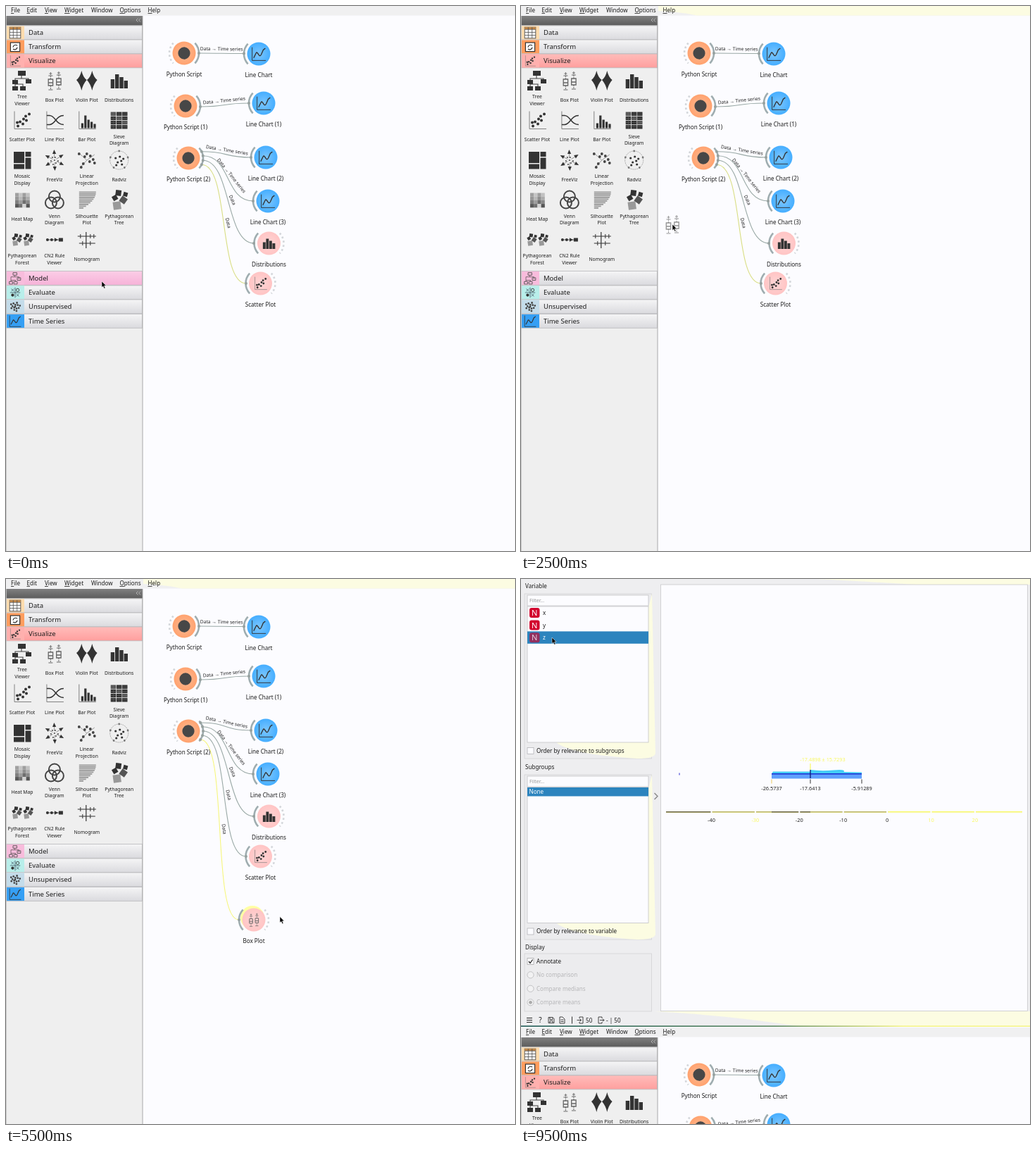
An HTML page that plays this animation: 723 px wide and 774 px high, repeating every 10000 ms.

```html
<!DOCTYPE html>
<html lang="en">
<head>
<meta charset="utf-8">
<title>Workflow editor</title>
<style>
html, body { margin: 0; width: 100%; height: 100%; overflow: hidden; background: #fcfcff; }
svg { display: block; width: 723px; height: 774px; font-family: "Noto Sans", "Open Sans", sans-serif; }
</style>
</head>
<body>
<svg id="stage" viewBox="0 0 723 774"></svg>
<script>
const INK = '#333', YELLOW = '#f8f860', WASH = '#fcfce2', BLUE = '#2c84be';
const PINK = '#ffc4c4', SKY = '#45aeff', ORANGE = '#ffa26e';

const rect = (x, y, w, h, fill, more = '') =>
  `<rect x="${x}" y="${y}" width="${w}" height="${h}" fill="${fill}" ${more}/>`;
const circle = (x, y, r, fill, more = '') =>
  `<circle cx="${x}" cy="${y}" r="${r}" fill="${fill}" ${more}/>`;
const fillPath = (d, fill = INK) => `<path d="${d}" fill="${fill}"/>`;
const line = (d, color = INK, width = 1, more = '') =>
  `<path d="${d}" fill="none" stroke="${color}" stroke-width="${width}" ${more}/>`;
const text = (x, y, s, size = 8.1, anchor = 'start', fill = '#1c1c1c') =>
  `<text x="${x}" y="${y + size * 0.36}" font-size="${size}" text-anchor="${anchor}" fill="${fill}">${s}</text>`;
const at = (x, y, body, scale = 1) => `<g transform="translate(${x} ${y}) scale(${scale})">${body}</g>`;
const range = n => [...Array(n).keys()];
const box = (x, y, w, h) => `M${x},${y}h${w}v${h}h${-w}z`;
const dot = (x, y, r = 1.7) => `M${x - r},${y}a${r},${r} 0 1 0 ${2 * r},0a${r},${r} 0 1 0 ${-2 * r},0z`;
const dots = (pts, r) => pts.map(p => dot(p[0], p[1], r)).join('');

const AXES = line('M-11,-13V12H13', '#777', 0.9);
const CLOUD = [[-6, 8], [-3, 2], [1, 5], [2, -2], [6, 0], [10, -9], [5, -6], [-7, 3]];
const square = (x, y, s, turn, fill = INK) =>
  `<rect x="${-s / 2}" y="${-s / 2}" width="${s}" height="${s}" fill="${fill}" transform="translate(${x} ${y}) rotate(${turn})"/>`;
const sapling = square(-3, 8, 11, -8, '#999') + square(-6, -3, 7, -30) + square(6, 0, 9, 35, '#555') +
  square(-1, -10, 8, 8) + square(9, -8, 6, 15);
const boxGlyph = (x, y) => at(x, y, line('M-3,-9h6M-3,11h6', '#666') +
  line('M0,-9V-4M0,5V11', '#666', 1, 'stroke-dasharray="2 1"') +
  line(box(-3.2, -4, 6.4, 9) + 'M-3.2,1h6.4', '#666', 1.3) + line('M-2,-12h4M0,-14v4', '#666', 0.9));
const crown = line('M-1,-7V-3M-10,3V-3H9V2M-10,3V8M-10,5H1V9', '#444', 1.1);

const icons = {
  tree: crown + fillPath(box(-6, -14, 11, 7) + box(5, -2, 8, 6) + box(-14, -1, 8, 6) + box(-14, 8, 8, 6) + box(-3, 8, 8, 6)),
  branches: crown + line(box(-5, -13, 9, 6) + box(5, -1, 8, 6) + box(-14, 8, 8, 6) + box(-3, 8, 8, 6), '#555', 1.5),
  box: boxGlyph(-5.5, 2) + boxGlyph(6, 1),
  violin: fillPath([-7.5, 7.5].map(x =>
    `M${x},-14Q${x + 2},-5 ${x + 7.3},-1Q${x + 2},5 ${x},14Q${x - 2},5 ${x - 7.3},-1Q${x - 2},-5 ${x},-14z`).join('')),
  dist: fillPath([13, 20, 16, 11].map((h, i) => box(-12 + i * 6.3, 11 - h, 5.4, h)).join('')),
  scatter: AXES + fillPath(dots(CLOUD, 2)),
  line: AXES + line('M-11,-7H-7C1,-7 2,6 13,6M-11,6H-7C1,6 2,-7 13,-7', INK, 1.5),
  bar: AXES + fillPath([7, 18, 12, 9, 6].map((h, i) => box(-8 + i * 4.4, 11 - h, 3.2, h)).join('')),
  sieve: range(12).map(i => rect(-12 + i % 3 * 8.2, -12 + (i / 3 | 0) * 6.2, 7.4, 5.4, i % 4 ? '#333' : '#555')).join('') +
    line('M-12,-9H12M-12,-3H12M-12,3H12M-12,9H12M-8,-12V12M4,-12V12', '#777', 0.4),
  mosaic: fillPath(box(-12, -12, 15, 16) + box(4.5, -12, 8, 7) + box(4.5, -3.5, 8, 16) + box(-12, 5.5, 15, 7)),
  freeviz: range(6).map(i => `<g transform="rotate(${i * 60 + 28})">${line('M3,0H11', '#888', 0.8)}${fillPath('M15,0L9,-2.6V2.6z')}</g>`).join('') +
    fillPath(dots([[-5, 1], [-2, 6], [1, -4], [5, 1], [2, 4], [-3, -4], [0, 0]], 1.1), '#555'),
  linear: line('M0,0L-11,-10M0,0L11,-8M0,0L-10,11', '#999', 1) +
    fillPath(dots([[-11, -9], [-3, -5], [0, -9], [5, -6], [9, -1], [11, 4], [4, 2], [-5, 5], [-8, 10]], 1.9), '#444'),
  radviz: line(dot(0, 0, 13), '#999', 0.8, 'stroke-dasharray="2 1"') +
    fillPath(dots(range(5).map(i => [13 * Math.sin(i * 1.257), -13 * Math.cos(i * 1.257)]), 1.4), '#777') +
    fillPath(dots([[-5, -3], [-2, 3], [1, -5], [3, 1], [6, -2], [4, 6], [-4, 7]], 1.6)),
  heat: range(16).map(i => {
    const v = 70 + (i * i * 37 + 90) % 150;
    return rect(-10 + i % 4 * 5.2, -10 + (i >> 2) * 5.2, 5.2, 5.2, `rgb(${v},${v},${v})`);
  }).join(''),
  venn: [[0, -5], [-5, 4], [5, 4]].map(p => circle(p[0], p[1], 8, 'none', 'stroke="#444" stroke-width="2"')).join(''),
  silhouette: range(10).map(i => rect(-11, -12 + i * 2.5, 24 - i * i * 0.22, 1.8, '#999')).join(''),
  pytree: sapling,
  forest: at(-8, 0, sapling, 0.62) + at(8, 0, sapling, 0.62),
  rules: line('M-11,0H8', INK, 0.8) + fillPath(dots([[-10, 0], [-4, 0]], 2) + 'M5,0L0,-2.7V2.7z' + box(6, -2.5, 6, 5)),
  nomogram: line('M-13,-5H13M-11,5H12M-1,-11V12', INK, 1.2) +
    line('M-9,-8v6M5,-8v6M10,-8v6M-6,2v6M5,2v6', INK, 1),
  chart: line('M-13,-13V13H14', INK, 1.3) + line('M-10,8L-5,-2Q-4,-4 -2,-1L1,3Q3,5 5,1L9,-8L13,-11', INK, 1.9),
  // plain disc in place of a logo
  script: circle(0, 0, 12, '#474747'),
  table: rect(-13, -13, 26, 26, '#fff', 'stroke="#555" stroke-width="1.6"') + rect(-13, -13, 26, 5, '#c98945') +
    line('M-13,-8H13M-13,-1H13M-13,6H13M-4.5,-13V13M4.5,-13V13', '#555', 1.4),
  transform: rect(-11, -10, 22, 21, '#fff', 'stroke="#333" stroke-width="2"') +
    line('M-5,1a6,6 0 0 1 10,-4M5,1a6,6 0 0 1 -10,4', INK, 2),
  evaluate: line('M0,-12V12M-12,0H12M-9,-9l6,6M-3,-9l-6,6M3,9l6,-6M3,3l6,6', '#456', 1.4) +
    circle(6, -6, 3.5, 'none', 'stroke="#333" stroke-width="1.5"') + circle(-6, 6, 3.5, INK),
  cluster: fillPath(dots(range(14).map(i => [3.2 * Math.sqrt(i) * Math.cos(i * 2.4), 3.2 * Math.sqrt(i) * Math.sin(i * 2.4)]), 2.3), '#444')
};

const grid = [
  ['tree', 'Tree', 'Viewer'], ['box', 'Box Plot'], ['violin', 'Violin Plot'], ['dist', 'Distributions'],
  ['scatter', 'Scatter Plot'], ['line', 'Line Plot'], ['bar', 'Bar Plot'], ['sieve', 'Sieve', 'Diagram'],
  ['mosaic', 'Mosaic', 'Display'], ['freeviz', 'FreeViz'], ['linear', 'Linear', 'Projection'], ['radviz', 'Radviz'],
  ['heat', 'Heat Map'], ['venn', 'Venn', 'Diagram'], ['silhouette', 'Silhouette', 'Plot'], ['pytree', 'Pythagorean', 'Tree'],
  ['forest', 'Pythagorean', 'Forest'], ['rules', 'CN2 Rule', 'Viewer'], ['nomogram', 'Nomogram']
];
const categories = [
  [28, 'Data', '#fddcae', 'table'], [48, 'Transform', '#ff9d5e', 'transform'], [68, 'Visualize', '#ffb0ae', 'scatter'],
  [376.5, 'Model', '#f8bcdc', 'branches'], [397, 'Evaluate', '#b8eeea', 'evaluate'],
  [417, 'Unsupervised', '#c4dcea', 'cluster'], [437.5, 'Time Series', '#359ff4', 'chart']
];
const menus = [[7, 'File'], [29.5, 'Edit'], [55, 'View'], [83, 'Widget'], [121, 'Window'], [161.5, 'Options'], [201.5, 'Help']];

const defs = `<defs>
<linearGradient id="row" x2="0" y2="1"><stop stop-color="#f5f5f6"/><stop offset="1" stop-color="#dadade"/></linearGradient>
<linearGradient id="open" x2="0" y2="1"><stop stop-color="#ffbcba"/><stop offset="1" stop-color="#ff9f9e"/></linearGradient>
<linearGradient id="hover" x2="0" y2="1"><stop stop-color="#fbcde6"/><stop offset="1" stop-color="#f6b2d8"/></linearGradient>
<linearGradient id="head" x2="0" y2="1"><stop stop-color="#808080"/><stop offset="1" stop-color="#5c5c5c"/></linearGradient>
<linearGradient id="edge"><stop stop-color="#1f5b55"/><stop offset=".5" stop-color="#5c8a60"/><stop offset=".75" stop-color="#f4f488"/></linearGradient>
<radialGradient id="shine"><stop stop-color="#fff" stop-opacity=".3"/><stop offset="1" stop-color="#fff" stop-opacity="0"/></radialGradient>
</defs>`;

function toolbox(mouse, hovering) {
  const cell = (mouse.x / 46 | 0) + 4 * Math.floor((mouse.y - 89) / 56.5);
  let s = rect(0, 14, 194, 760, '#efefef') + rect(0, 14, 194, 13.5, 'url(#head)') +
    line('M187.5,17.5l-2.5,2.5l2.5,2.5M191,17.5l-2.5,2.5l2.5,2.5', '#c8c8c8', 0.8);
  for (const [y, name, color, icon] of categories) {
    const lit = hovering && mouse.x < 194 && mouse.y > y && mouse.y < y + 20;
    const fill = name === 'Visualize' ? 'url(#open)' : lit ? 'url(#hover)' : 'url(#row)';
    s += rect(0.5, y, 193, 19.8, fill, 'stroke="#b9b9bc" stroke-width=".8"') +
      rect(1, y + 0.4, 25, 19, color) + at(13, y + 10, icons[icon], 0.6) + text(32, y + 9.6, name, 9.5);
  }
  grid.forEach(([icon, a, b], i) => {
    const x = 23 + i % 4 * 45.9, y = 106 + (i >> 2) * 56.5;
    if (hovering && i === cell && mouse.x < 184)
      s += rect(x - 23, y - 17, 47, 59, '#fdfdfa', 'rx="5"');
    s += at(x, y, icons[icon]);
    s += b ? text(x, y + 23, a, 6.8, 'middle') + text(x, y + 32.3, b, 6.8, 'middle') : text(x, y + 27.5, a, 6.8, 'middle');
  });
  return s + line('M0.5,14V774', '#c0c0c0', 0.8) + line('M194,14V774', '#a8a8a8');
}

function arc(x, y, side, dotted) {
  const dx = 21 * Math.cos(0.75) * side, dy = 21 * Math.sin(0.75);
  return line(`M${x + dx},${y - dy}A21,21 0 0 ${side > 0 ? 1 : 0} ${x + dx},${y + dy}`,
    dotted ? '#d3d6da' : '#9fadb0', 2.6, dotted ? 'stroke-dasharray="2.6 3.4"' : '');
}

// ends: left and right connector, '-' solid, ':' dotted, ' ' none
function node(x, y, icon, color, label, ends, selected) {
  let s = [0, 1].map(i => ends[i] === ' ' ? '' : arc(x, y, i ? 1 : -1, ends[i] === ':')).join('');
  s += circle(x, y, 16.5, color) + circle(x, y, 16.5, 'url(#shine)') + at(x, y, icons[icon], 0.72);
  if (selected) s += rect(x - 16.5, y + 21.5, 34, 14.5, BLUE, 'rx="1.5"');
  return s + text(x, y + 30.3, label, 8.1, 'middle', selected ? '#fff' : '#1c1c1c');
}

const REACH = 40;
function link(x0, y0, x1, y1, label, color = '#9aa9a6') {
  const turn = Math.atan2(y1 - y0, x1 - x0 - REACH) * 180 / Math.PI;
  const tilt = Math.atan2(2 * (y1 - y0), 2 * (x1 - x0 - REACH) + REACH) * 180 / Math.PI;
  return line(`M${x0},${y0}C${x0 + REACH},${y0} ${x1 - REACH},${y1} ${x1},${y1}`, color, 1.1) +
    fillPath(dot(x0, y0, 2) + dot(x1, y1, 2), '#97a19f') +
    (label ? `<text transform="translate(${(x0 + x1) / 2} ${(y0 + y1) / 2}) rotate(${tilt})" y="-4" font-size="6.7" text-anchor="middle" fill="#222">${label}</text>` : '');
}

function canvas(t, mouse) {
  const series = 'Data → Time series', linked = t >= 5000, pulling = t >= 4000 && !linked;
  const targets = [[348, 215, series], [351, 277, series], [352, 337, 'Data'], [341, 394, 'Data']];
  if (linked) targets.push([331, 484, 'Data']);
  if (pulling) targets.push([mouse.x, mouse.y, '']);
  let s = '';
  if (t >= 3000) {
    const selected = !linked;
    s += circle(350, 481, 17, '#ffffa4') +
      node(352, 484, 'box', selected ? '#ff9f9f' : PINK, 'Box Plot', linked ? '-:' : '::', selected);
  }
  s += node(253, 67, 'script', ORANGE, 'Python Script', ':-') + node(359, 68, 'chart', SKY, 'Line Chart', '- ') +
    node(255, 142, 'script', ORANGE, 'Python Script (1)', ':-') + node(366, 138, 'chart', SKY, 'Line Chart (1)', '- ') +
    node(259, 216, 'script', ORANGE, 'Python Script (2)', ':-') + node(369, 215, 'chart', SKY, 'Line Chart (2)', '- ') +
    node(372, 277, 'chart', SKY, 'Line Chart (3)', '- ') + node(373.5, 337, 'dist', PINK, 'Distributions', '-:') +
    node(361.5, 394, 'scatter', PINK, 'Scatter Plot', '-:') +
    link(274, 67, 338, 67.5, series) + link(276, 143, 345, 138, series);
  const n = targets.length;
  targets.forEach(([x, y, label], i) => {
    const a = (i - (n - 1) / 2) * 0.305;
    s += link(259 + 21 * Math.cos(a), 216 + 21 * Math.sin(a), x, y, label,
      i === n - 1 ? (n > 4 ? '#f6f67c' : '#d9de84') : undefined);
  });
  return s;
}

function editor(t, mouse) {
  let s = rect(0, 0, 723, 774, '#fcfcff') + rect(0, 0, 723, 13.5, '#f0f0f1');
  if (t >= 500 && t < 6500) s += fillPath('M195,0H723V13.5H250Q225,8 195,7z', WASH);
  for (const [x, name] of menus)
    s += text(x, 6.3, name === 'Window' ? name : `<tspan text-decoration="underline">${name[0]}</tspan>${name.slice(1)}`);
  const hovering = t < 6500 && !(t >= 2500 && t < 3000);
  return s + toolbox(mouse, hovering) + canvas(t, mouse);
}

const plots = {
  x: { bar: [321.5, 421, 521], labels: ['13.5', '25.5', '37.5'], note: '25.5 ± 14.4309', noteX: 438.5,
       first: 10, step: 10, ticks: 5, x0: 292, gap: 83.25, dark: 4, low: 217 },
  y: { bar: [395, 424, 461], labels: ['-2.08151', '0.0907814', '2.65115'], note: '0.070472 ± 4.2654', noteX: 439,
       first: -10, step: 5, ticks: 6, x0: 280, gap: 71.4, dark: 4, high: 477 },
  z: { bar: [356, 411, 484], labels: ['-26.5737', '-17.6413', '-5.91289'], note: '-17.4898 ± 15.7293', noteX: 428.5,
       first: -40, step: 10, ticks: 7, x0: 270.5, gap: 62.4, dark: 5, low: 225 }
};

function boxPlot(p, name) {
  const [a, m, b] = p.bar, w = b - m;
  let s = rect(a, 276, b - a, 7.5, '#5f9ffc') +
    fillPath(`M${a},276.5L${a + 2},273.5H${m}V271Q${m + w * 0.2},273 ${m + w * 0.45},271.5T${m + w * 0.65},274L${b},274.5V276.5z`, '#42cdf6') +
    line(`M${a},276.8H${p.high || b}`, '#1c2fd2', 1.4) + line(`M${m},271V283`, '#10207c', 1.4) +
    line(`M${m},262V271`, YELLOW, 1.2) + text(p.noteX, 256, p.note, 7.3, 'middle', YELLOW);
  if (p.low) s += line(`M${p.low},275.5v3`, '#2a2ad0', 1);
  p.bar.forEach((x, i) => {
    s += line(`M${x},284.5V290.5`, i ? '#333' : '#e9c860', 1) +
      text(name === 'y' && !i ? 389 : x, 297, p.labels[i], 7.3, 'middle', name === 'y' && !i ? '#b5b048' : '#222');
  });
  const last = p.x0 + p.gap * (p.dark - 1);
  s += line('M206,330.7H712', YELLOW, 1.6) + line(`M206,330.7H${last}`, '#b9b368', 1.6) +
    line(`M206,330.7H${p.x0}M${a},330.7H${m}`, '#6f6a4c', 1.6);
  for (let i = 0; i < p.ticks; i++) {
    const x = p.x0 + i * p.gap, pale = i >= p.dark || (name !== 'x' && i === 1);
    s += rect(x - 1, 329, 2, 3.5, '#fcfcff') + text(x, 342, p.first + i * p.step, 7.5, 'middle', pale ? YELLOW : '#222');
  }
  return s;
}

function listGroup(title, top, bottom, listEnd, note) {
  const edge = 'stroke="#c4c4c6" stroke-width=".8"';
  return text(6, top - 11, title) + rect(5, top, 180.5, bottom - top, '#ececee', 'stroke="#d2d2d4" stroke-width=".8"') +
    fillPath(`M181,${top + 20}L186,${top}L191,${bottom - 8}Q191,${bottom} 165,${bottom}Q70,${bottom - 6} 50,${listEnd}H181z`, WASH) +
    rect(9, top + 2, 172, 15, '#fcfcff', edge) + text(12, top + 9.3, 'Filter...', 7, 'start', '#999') +
    rect(9, top + 18, 172, listEnd - top - 18, '#fcfcff', edge) +
    rect(9, listEnd + 7.5, 9, 9, '#fcfcff', 'stroke="#b5b5b8" stroke-width=".8"') + text(22, listEnd + 12, note);
}

function chartWindow(name) {
  let s = rect(0, 0, 723, 636, '#eeeef0') + fillPath('M420,0H723V8H560Q480,3 420,0z', WASH) +
    fillPath('M190,614H723V636H400Q300,620 190,614z', WASH) +
    rect(198.5, 8, 521, 605.5, '#fcfcff', 'stroke="#c9c9cb" stroke-width=".8"') +
    line('M189.5,304l4.5,4.5l-4.5,4.5', '#888', 1.4) +
    listGroup('Variable', 21, 255, 232, 'Order by relevance to subgroups') +
    listGroup('Subgroups', 278, 512, 488.5, 'Order by relevance to variable');
  ['x', 'y', 'z'].forEach((v, i) => {
    const y = 48 + i * 17.6, on = v === name;
    if (on) s += rect(9, y - 8.8, 172, 17.4, BLUE);
    s += rect(12, y - 7, 14.5, 14, on ? '#93305f' : '#d2042d', 'rx="3"') +
      text(19.2, y, 'N', 11, 'middle', on ? '#e3cfe0' : '#fff') + text(31, y, v, 8.1, 'start', on ? '#fff' : '#222');
  });
  s += rect(9, 296, 172, 12.5, BLUE) + text(11.5, 302, 'None', 8.1, 'start', '#fff') +
    text(6, 523, 'Display') + rect(5, 532, 180.5, 82, '#ececee', 'stroke="#d2d2d4" stroke-width=".8"') +
    rect(9, 538.5, 9, 9, '#fcfcff', 'stroke="#aaa" stroke-width=".8"') + line('M11,543l2,2.5l3.5,-5', '#222', 1.3) +
    text(22, 543, 'Annotate');
  ['No comparison', 'Compare medians', 'Compare means'].forEach((label, i) => {
    const y = 562.3 + i * 19.5;
    s += circle(13.5, y, 4.6, '#f2f2f3', 'stroke="#bdbdbf" stroke-width=".9"') + text(22, y, label, 8.1, 'start', '#b6b6b8');
    if (i === 2) s += circle(13.5, y, 2.4, '#aaa');
  });
  s += line('M8,623.5h8M8,626.5h8M8,629.5h8', '#222', 1.2) + text(27.5, 626.5, '?', 10, 'middle') +
    line('M39,622.5h6l2,2v6h-8zM41,622.5v3h4v-3M41,630.5v-3h4v3', INK, 0.9) +
    line('M55,622h4l3,3v6h-7zM56.5,626h4M56.5,628.5h4', INK, 0.9) + line('M72.5,621.5v10', '#333', 1) +
    line('M83,624v-2h5v9h-5v-2M79.5,626.5h6l-2,-2m2,2l-2,2', INK, 0.9) + text(92, 626.7, '50') +
    line('M115,624v-2h-5v9h5v-2M112,626.5h6l-2,-2m2,2l-2,2', name === 'y' ? '#999' : INK, 0.9) + text(121, 626.7, '- | 50') +
    rect(0, 634.3, 723, 1.6, 'url(#edge)');
  return s + boxPlot(plots[name], name);
}

const track = [
  [0, 136, 391], [1500, 101, 170], [2000, 73, 112], [2500, 215, 310], [3000, 352, 482], [3500, 277.5, 234],
  [4500, 331, 480], [5000, 352, 484], [5500, 389, 479.5], [6000, 358, 484], [7000, 97, 307.5],
  [7500, 44, 66], [8000, 44, 83], [10000, 44, 83]
];

function pointer(t) {
  const i = track.findIndex(k => k[0] > t), [t0, x0, y0] = track[i - 1], [t1, x1, y1] = track[i];
  const f = (t - t0) / (t1 - t0);
  return { x: x0 + (x1 - x0) * f, y: y0 + (y1 - y0) * f };
}

const stage = document.getElementById('stage');

function draw(t) {
  const mouse = pointer(t);
  let s = defs;
  if (t < 6500) s += editor(t, mouse);
  else s += at(0, 637, editor(t, mouse)) + chartWindow(t < 7500 ? 'x' : t < 8500 ? 'y' : 'z');
  if (t === 2500) s += `<g opacity=".7">${at(mouse.x, mouse.y, icons.box)}</g>`;
  stage.innerHTML = s + at(mouse.x, mouse.y,
    '<path d="M0,0V8.6L2,6.9L3.5,10.2L5,9.5L3.5,6.3H6.2z" fill="#000" stroke="#fff" stroke-width=".5"/>');
}

const start = performance.now();
let shown = -1;
function tick() {
  const t = Math.floor((performance.now() - start) % 10000 / 500) * 500;
  if (t !== shown) draw(shown = t);
  requestAnimationFrame(tick);
}
tick();
</script>
</body>
</html>
```
